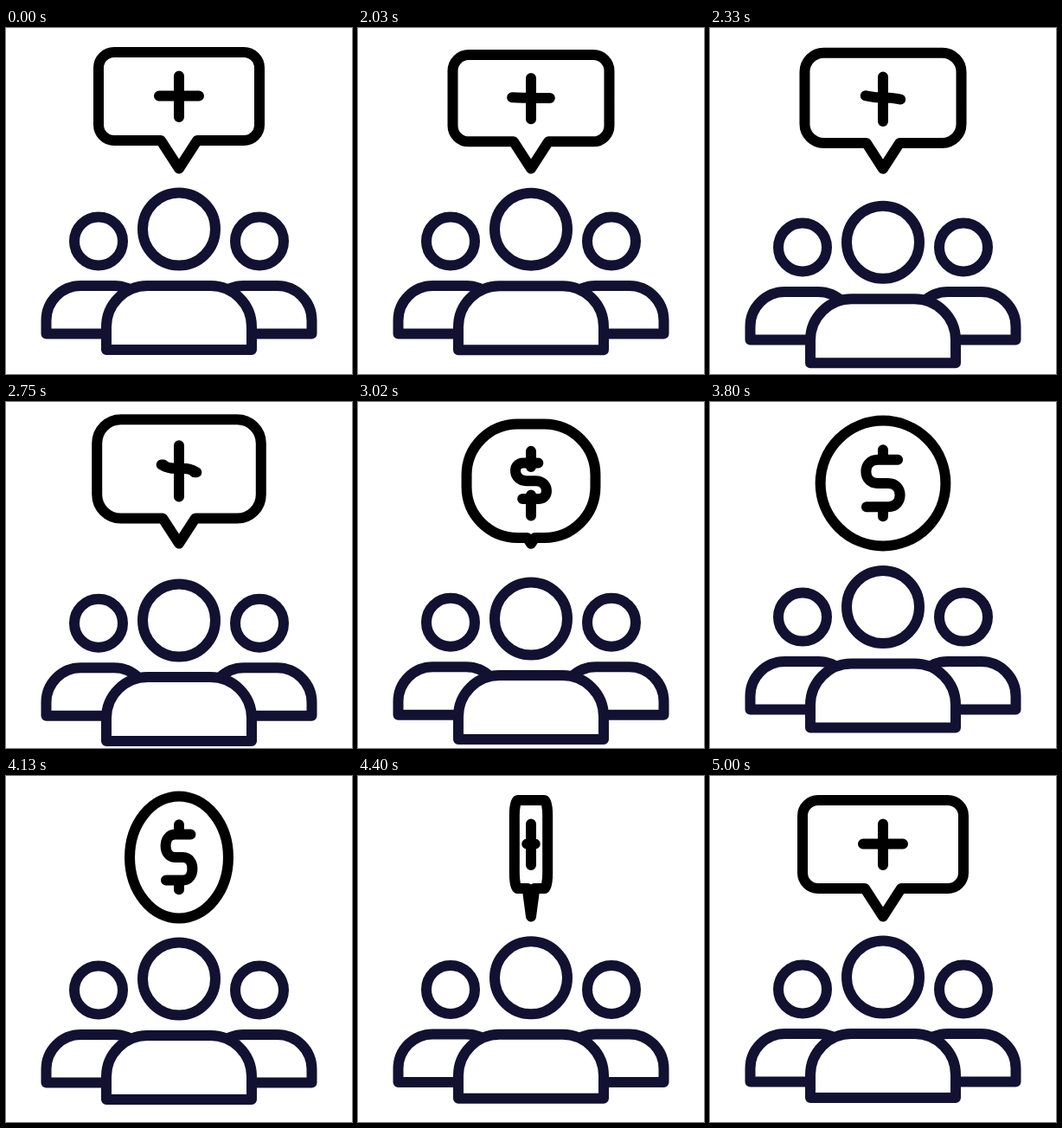
Write an HTML page with a canvas that moves like this. It is 400x400 px and loops after 5.03 s.

```html
<!DOCTYPE html>
<html>
<head>
<meta charset="utf-8">
<style>
html, body { margin: 0; width: 100%; height: 100%; overflow: hidden; background: #fff; }
canvas { display: block; width: 400px; height: 400px; }
</style>
</head>
<body>
<canvas id="stage" width="400" height="400"></canvas>
<script>
const ctx = document.getElementById('stage').getContext('2d');
const LOOP = 5030, STEP = 30, START = 2000, SWAP = 4360;
const INK = '#121131';

const mix = (a, b, k) => a + (b - a) * k;
const clamp = k => Math.min(1, Math.max(0, k));
const smooth = k => k * k * (3 - 2 * k);
const linear = k => k;
const easeOut = k => 1 - (1 - k) ** 2;

// Quick start, long settling tail: cubic-bezier(.3, 0, .2, 1)
function settle(x) {
  let lo = 0, hi = 1;
  for (let i = 0; i < 25; i++) {
    const s = (lo + hi) / 2, r = 1 - s;
    if (0.9 * r * r * s + 0.6 * r * s * s + s ** 3 < x) lo = s; else hi = s;
  }
  return smooth(lo);
}

// Keys are [time, value, easing into this key]
function track(t, keys) {
  if (t <= keys[0][0]) return keys[0][1];
  for (let i = 1; i < keys.length; i++) {
    const [t0, v0] = keys[i - 1], [t1, v1, ease = smooth] = keys[i];
    if (t < t1) return mix(v0, v1, ease((t - t0) / (t1 - t0)));
  }
  return keys[keys.length - 1][1];
}

const DIP = [[START, 0], [2700, 20, settle], [5000, 0, settle]];
const SIZE = [[START, 1], [2160, 0.93, easeOut], [2550, 1.08], [2750, 1.055],
  [3360, 0.86], [3680, 1.025], [3850, 1], [SWAP, 0.965]];
const MORPH = [[START, 0], [2060, 0.03, linear], [2750, 0.15, linear], [3150, 1]];
const TURN = [[3950, 1], [SWAP, 0, k => k * k]];
const OPEN = [[SWAP, 0], [4900, 1, k => 1 - (1 - k) ** 3]];

// The S of the dollar sign around the coin centre, as bezier points
const S_CURVE = [[17, -27], [-6, -27], [-24, -27], [-24, 0], [-6, 0],
  [6, 0], [24, 0], [24, 27], [6, 27], [-19, 27]];

function ring(x, y, r) {
  ctx.beginPath();
  ctx.arc(x, y, r, 0, 7);
  ctx.stroke();
}

function torso(x0, x1, y0, y1, r) {
  ctx.beginPath();
  ctx.moveTo(x0, y1);
  ctx.arcTo(x0, y0, x0 + r, y0, r);
  ctx.arcTo(x1, y0, x1, y0 + r, r);
  ctx.lineTo(x1, y1);
  ctx.closePath();
  ctx.fill();
  ctx.stroke();
}

function people(dip) {
  const side = dip * 0.46;
  ctx.strokeStyle = INK;
  for (const flip of [1, -1]) {
    ctx.save();
    ctx.translate(200, side);
    ctx.scale(flip, 1);
    torso(-153.5, -35, 298, 353.5, 40);
    ring(-93, 246.5, 28);
    ctx.restore();
  }
  torso(116, 284, 298 + dip, 372 + dip, 47.5);
  ring(200, 232.5 + dip, 42);
}

// Outline around (0, 0): speech bubble at m = 0, circle at m = 1
function outline(m) {
  const w = mix(93, 72, m), top = mix(-66, -72, m), base = mix(36, 72, m);
  const r = mix(18, 72, m), notch = Math.min(mix(21, 0, m), w - r);
  const tip = Math.max(base, mix(68.5, 72, m));
  ctx.moveTo(0, tip);
  ctx.lineTo(notch, base);
  ctx.arcTo(w, base, w, base - r, r);
  ctx.arcTo(w, top, w - r, top, r);
  ctx.arcTo(-w, top, -w, top + r, r);
  ctx.arcTo(-w, base, -w + r, base, r);
  ctx.lineTo(-notch, base);
  ctx.closePath();
}

// Plus at m = 0, dollar sign at m = 1
function sign(m) {
  const p = S_CURVE.map(([x, y], i) =>
    [mix(-23 * Math.cos(Math.PI * i / 9), x, m), mix(-15.5, y, m)]);
  const curve = i => ctx.bezierCurveTo(...p[i], ...p[i + 1], ...p[i + 2]);
  ctx.moveTo(...p[0]);
  ctx.lineTo(...p[1]);
  curve(2);
  ctx.lineTo(...p[5]);
  curve(6);
  ctx.lineTo(...p[9]);

  const mid = mix(-15.5, 0, m), gap = 27 * smooth(clamp(m * 2 - 1));
  const stretch = Math.min(1, m * 2);
  ctx.moveTo(0, -38.5);
  ctx.lineTo(0, mid - gap);
  ctx.moveTo(0, mid + gap);
  ctx.lineTo(0, mix(9, 38, stretch));
}

function badge(t) {
  const swapped = t >= SWAP;
  const m = swapped ? 0 : track(t, MORPH);
  const size = swapped ? 1 : track(t, SIZE);
  const turn = track(t, swapped ? OPEN : TURN);
  ctx.strokeStyle = '#000';
  ctx.beginPath();
  ctx.save();
  // The bubble scales from its tip, the coin from its centre
  ctx.translate(200, 94 + 69 * (1 - size) * (1 - m));
  ctx.scale(Math.max(0.01, size * turn), size);
  outline(m);
  sign(m);
  ctx.restore();
  ctx.stroke();
}

function draw() {
  const now = performance.now() % LOOP;
  const t = START + Math.max(0, Math.floor((now - START) / STEP)) * STEP;
  ctx.fillStyle = '#fff';
  ctx.fillRect(0, 0, 400, 400);
  ctx.lineWidth = 12;
  ctx.lineCap = ctx.lineJoin = 'round';
  people(track(t, DIP));
  badge(t === START ? 5000 : t);
  requestAnimationFrame(draw);
}
draw();
</script>
</body>
</html>
```
